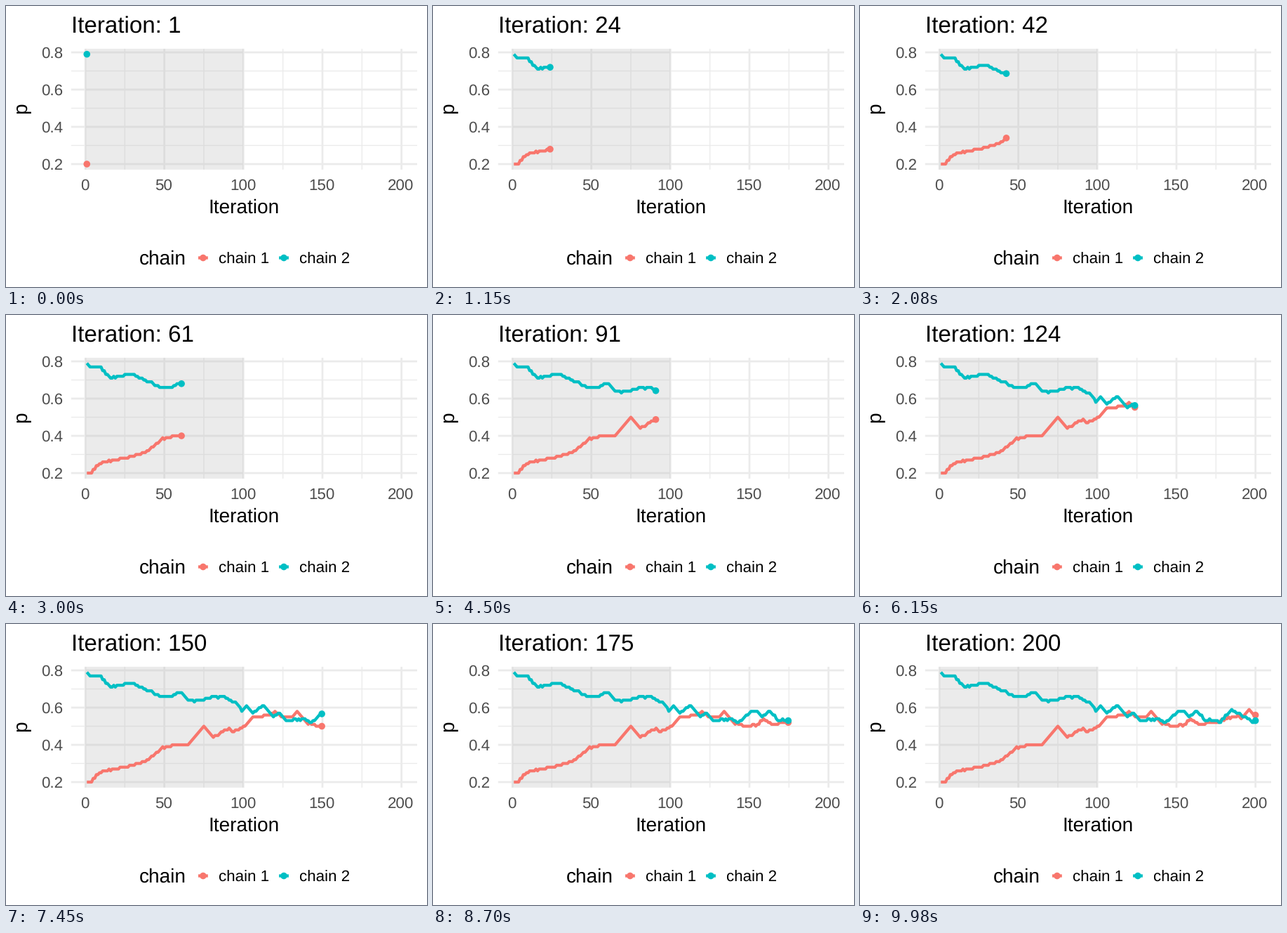
A matplotlib script that plays this animation: 600 by 400 pixels, repeating every 10000 ms.

```python
import numpy as np
import matplotlib.pyplot as plt
from matplotlib.animation import FuncAnimation
from matplotlib.patches import Circle, Rectangle

W, H, DPI = 600, 400, 100
FRAMES, INTERVAL = 400, 25
STEPS = 200
LEFT, RIGHT, TOP, BOTTOM = 92.8, 586, 60.9, 232.9
RED, TEAL = "#F8766D", "#00BFC4"
GRID, TICK = "#EBEBEB", "#4D4D4D"
LINE, RADIUS = 4.27, 4.8
SMALL, BASE, LARGE = 22.4, 28, 33.2

plt.rcParams.update({"font.family": "Liberation Sans", "text.hinting": "none"})

# Main turns of each walk: (iteration, p in percent)
TURNS_1 = [(1, 20), (3, 20), (9, 25), (25, 28), (38, 31), (48, 38), (57, 40),
           (65, 40), (75, 50), (81, 44), (91, 49), (93, 47), (100, 49.5),
           (106, 55), (116, 55.5), (120, 58), (124, 55), (131, 55), (134, 58),
           (140, 52), (146, 50), (155, 50.5), (159, 54), (162, 51.5),
           (173, 51.5), (189, 56), (191, 54), (196, 59), (199, 56), (200, 56)]
TURNS_2 = [(1, 79), (3, 77), (9, 77), (16, 71), (29, 73), (36, 71), (47, 66),
           (54, 65.5), (58, 68), (61, 68), (65, 64), (73, 63.5), (80, 65.5),
           (87, 66), (96, 62), (99, 58), (102, 61), (106, 57), (113, 61),
           (119, 55), (123, 57), (127, 53), (139, 54), (143, 52), (151, 58),
           (155, 57.5), (158, 55), (163, 58), (168, 53.5), (178, 52.5),
           (185, 59), (193, 55), (199, 52), (200, 53)]


def px(size):
    return size * 72 / DPI


def to_x(it):
    return 113.0 + 2.2531 * np.asarray(it)


def to_y(p):
    return 66 + (0.8 - np.asarray(p)) * 265


def make_walk(turns, rng):
    """Join the turns in whole-percent steps, rounding up or down at random."""
    percent = np.interp(ITS, *zip(*turns))
    return np.round(percent + rng.uniform(-0.4, 0.4, STEPS)) / 100


def label(x, y, text, size, color="black", ha="left", **kw):
    return ax.text(x, y, text, fontsize=px(size), color=color, ha=ha,
                   va="baseline", **kw)


def stroke(xs, ys, color, width, z):
    return ax.plot(xs, ys, color=color, lw=px(width), zorder=z, snap=False,
                   solid_capstyle="butt", solid_joinstyle="round")[0]


def dot(x, y, color, z):
    return ax.add_patch(Circle((x, y), RADIUS, fc=color, lw=0, zorder=z))


def grid_x(it, width):
    stroke([to_x(it)] * 2, [TOP, BOTTOM], GRID, width, 1)


def grid_y(p, width):
    stroke([LEFT, RIGHT], [to_y(p)] * 2, GRID, width, 1)


fig = plt.figure(figsize=(W / DPI, H / DPI), dpi=DPI, facecolor="white")
ax = fig.add_axes([0, 0, 1, 1])
ax.set_xlim(0, W)
ax.set_ylim(H, 0)
ax.axis("off")

# Panel: minor grid, major grid, shaded warm-up
for it in range(25, 200, 50):
    grid_x(it, 1.36)
for p in (0.3, 0.5, 0.7):
    grid_y(p, 1.36)
for it in range(0, 201, 50):
    grid_x(it, 2.72)
    label(to_x(it) - 0.7, 262, str(it), SMALL, TICK, "center")
for p in (0.2, 0.4, 0.6, 0.8):
    grid_y(p, 2.72)
    label(50, to_y(p) + 8, f"{p:.1f}", SMALL, TICK)
ax.add_patch(Rectangle((to_x(0), TOP), to_x(100) - to_x(0), BOTTOM - TOP,
                       fc="#BEBEBE", alpha=0.3, lw=0, zorder=2, snap=False))

title = label(LEFT, 38.5, "", LARGE)
label(339.4, 295, "Iteration", BASE, ha="center")
label(28.5, 145.5, "p", BASE, ha="center", rotation=90,
      rotation_mode="anchor")

# Legend
label(189.5, 368, "chain", BASE)
for x, color, name in ((280.9, RED, "chain 1"), (396, TEAL, "chain 2")):
    stroke([x - 6.9, x + 6.9], [358.5] * 2, color, LINE, 3)
    dot(x, 358.5, color, 4)
    label(x + 21.7, 366.5, name, SMALL)

ITS = np.arange(1, STEPS + 1)
rng = np.random.default_rng(4)
walks = [make_walk(turns, rng) for turns in (TURNS_1, TURNS_2)]
lines = [stroke([], [], color, LINE, 3 + i)
         for i, color in enumerate((RED, TEAL))]
dots = [dot(0, 0, color, 6 + i) for i, color in enumerate((RED, TEAL))]


def update(frame):
    now = 1 + (STEPS - 1) * frame / (FRAMES - 1)
    title.set_text(f"Iteration: {round(now)}")
    past = ITS[ITS < now]
    for walk, line, head in zip(walks, lines, dots):
        p = np.interp(now, ITS, walk)
        line.set_data(to_x(np.append(past, now)),
                      to_y(np.append(walk[:len(past)], p)))
        head.center = to_x(now), to_y(p)
    return [title, *lines, *dots]


anim = FuncAnimation(fig, update, frames=FRAMES, interval=INTERVAL,
                     repeat=True, repeat_delay=0, blit=False)
plt.show()
```
